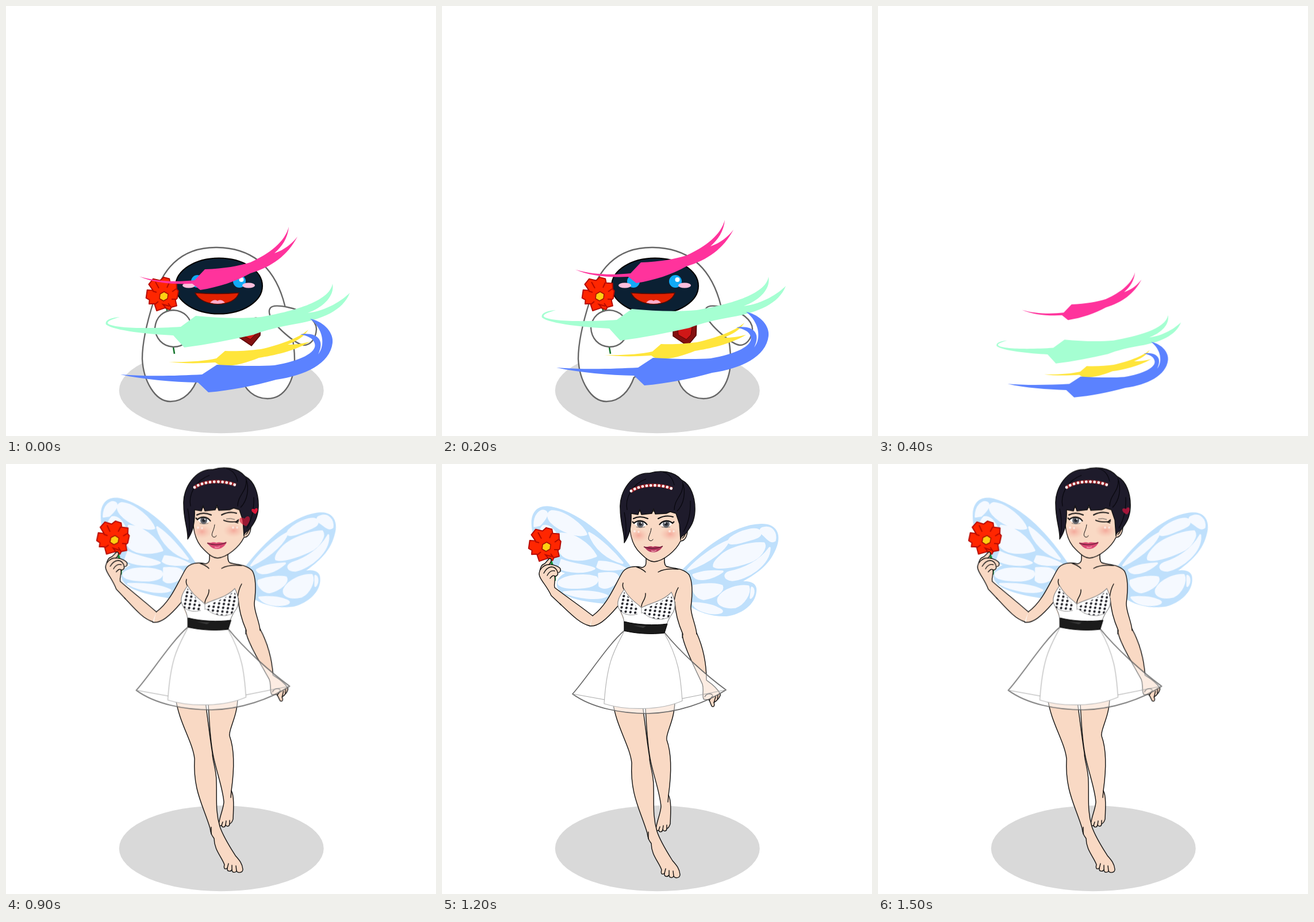
An HTML page that plays this animation: 748x748 px, repeating every 2 s.

```html
<!DOCTYPE html>
<html lang="en">
<head>
<meta charset="utf-8">
<title>Transformation</title>
<style>
  html, body { margin: 0; width: 100%; height: 100%; overflow: hidden; background: #fff; }
  svg { display: block; width: 100%; height: 100%; }
  .robot, .shadow, .fairy, .ribbons, .pose, .open, .wink, .heart1, .heart2 {
    animation: 2s step-end infinite;
  }
  .robot { animation-name: robot; }
  .shadow { animation-name: shadow; }
  .fairy { animation-name: fairy; }
  .ribbons { animation-name: swirl; }
  .pose { animation-name: pose; }
  .open { animation-name: open; }
  .wink { animation-name: wink; }
  .heart1 { animation-name: heart1; }
  .heart2 { animation-name: heart2; }

  @keyframes robot { 0% { opacity: 1 } 15%, 100% { opacity: 0 } }
  @keyframes shadow { 0%, 30%, 100% { opacity: 1 } 15% { opacity: 0 } }
  @keyframes fairy { 0% { opacity: 0 } 30%, 100% { opacity: 1 } }
  @keyframes swirl {
    0% { transform: none; opacity: 1 }
    10% { transform: translate(0, -12px); opacity: 1 }
    15% { transform: translate(38px, 86px) scale(.878); opacity: 1 }
    20% { transform: translate(75px, 172.8px) scale(.756); opacity: 1 }
    30% { transform: translate(89.5px, 193.8px) scale(.756); opacity: 1 }
    45%, 100% { transform: none; opacity: 0 }
  }
  @keyframes pose {
    0%, 60% { transform: none }
    45%, 75%, 100% { transform: var(--b) }
  }
  @keyframes open { 0%, 60% { opacity: 1 } 45%, 75%, 100% { opacity: 0 } }
  @keyframes wink { 0%, 60% { opacity: 0 } 45%, 75%, 100% { opacity: 1 } }
  @keyframes heart1 { 0%, 60%, 100% { opacity: 0 } 45% { opacity: 1 } }
  @keyframes heart2 { 0% { opacity: 0 } 75%, 100% { opacity: 1 } }

  .upper { --b: translate(-1px, -6.4px); }
  .skirt { --b: translate(-.5px, -6.4px); }
  .legs { --b: translate(-2px, -2px) scale(1, .99); }
  .wingL { --b: translate(2px, -6px) rotate(4deg) scale(.99); transform-origin: 325px 178px; }
  .wingR { --b: translate(-1px, -6px) rotate(-6.5deg) scale(.98); transform-origin: 415px 185px; }
  .armL { --b: translate(-1px, -7px) rotate(3.6deg); transform-origin: 259px 272px; }
  .armR { --b: translate(-1px, -6.4px) rotate(-4deg); transform-origin: 432px 295px; }

  .skin { fill: #f9d9c4; }
  .ink { stroke: #111; stroke-width: 1.4; stroke-linecap: round; stroke-linejoin: round; }
  .line { fill: none; }
  .wing { fill: #bfe0fc; }
  .cell { fill: #f5f9ff; stroke: #f5f9ff; stroke-width: 3.5; stroke-linejoin: round; }
  .shell { fill: #fff; stroke: #666; stroke-width: 2.4; }
</style>
</head>
<body>
<svg viewBox="0 0 748 748" xmlns="http://www.w3.org/2000/svg">
  <defs>
    <g id="flower">
      <path d="M-21-29 L-9-27 L-3-33 L7-31 L9-24 L20-24 L21-14 L24-11 L23 2 L20 5 L23 15 L14 18 L12 23 L3 20 L-11 26 L-16 14 L-25 15 L-25 8 L-31 5 L-30-9 L-20-9 L-28-19Z"
        transform="rotate(4)" fill="#ff2600" stroke="#b60a00" stroke-width="2" stroke-linejoin="round"/>
      <path d="M-20-9 L-13-7 M-15-25 L-9-14 M9-24 L5-15 M21-13 L14-8 M20 5 L13 5 M12 19 L7 12 M-16 14 L-10 9 M3 20 L-2 14 L9 17"
        fill="none" stroke="#b60a00" stroke-width="2"/>
      <path d="M-7-4 L0-8 L7-4 L6 4 L-1 8 L-8 4Z" fill="#ffd012" stroke="#a31700" stroke-width="1.6"/>
    </g>
    <path id="heart" d="M0 5 C-9-1-5-8 0-3 C5-8 9-1 0 5Z"/>
    <pattern id="dots" width="8.4" height="6.6" patternUnits="userSpaceOnUse" patternTransform="translate(313 226) skewX(-5) rotate(6)">
      <circle cx="4" cy="3.3" r="2.1" fill="#1b1b22"/>
    </pattern>
    <radialGradient id="blush">
      <stop offset="0" stop-color="#f29a8e" stop-opacity=".75"/>
      <stop offset="1" stop-color="#f6b6a5" stop-opacity="0"/>
    </radialGradient>
  </defs>

  <ellipse class="shadow" cx="374.700" cy="668.700" rx="178" ry="74.500" fill="#d9d9d9"/>

  <g class="robot">
    <path class="shell" d="M367 420 C302 419 269 461 257 513 C242 560 237 590 237 614 C239 652 259 688 286 688 C310 688 326 669 334 646 C350 638 398 638 410 646 C414 667 432 683 455 683 C486 683 502 650 502 615 C502 583 493 550 482 510 C465 455 430 421 367 420Z"/>
    <path class="shell" d="M459 538 C454 521 466 519 490 524 C522 530 540 548 540 562 C539 580 529 590 518 590 C503 588 466 556 459 538Z"/>
    <ellipse cx="370.500" cy="487" rx="75.500" ry="48.500" fill="#0b2033" stroke="#000" stroke-width="2"/>
    <g fill="#12aaf6"><circle cx="333" cy="479" r="11"/><circle cx="406" cy="479" r="11"/></g>
    <circle cx="409.500" cy="476" r="4" fill="#fff"/>
    <g fill="#ffbfdd"><ellipse cx="318" cy="486" rx="11" ry="4.500"/><ellipse cx="422" cy="486" rx="11" ry="4.500"/></g>
    <path d="M329 499 Q367 502 405 499 C398 525 340 525 329 499Z" fill="#e32100" stroke="#5d0a00" stroke-width="1.500"/>
    <path d="M355 516 Q362 509 368 513 Q374 509 381 516 Q368 520 355 516Z" fill="#ffaccb"/>
    <path d="M402 574 L402 553 Q414 540 423 549 Q432 538 443 545 L442 573 L427 591Z" fill="#841010" stroke="#500" stroke-width="1.500"/>
    <path d="M410 560 L424 555 L436 551 L433 572 L425 580 L411 572Z" fill="#cf1717" stroke="#600" stroke-width="1"/>
    <path d="M279 523 L293 605" stroke="#14752c" stroke-width="2.600"/>
    <use href="#flower" x="275" y="505"/>
    <path class="shell" d="M291 529 C310 530 323 543 323 562 C321 581 310 593 291 593 C272 592 260 578 259 560 C261 540 274 530 291 529Z"/>
  </g>

  <g class="fairy">
    <g class="pose wingL">
      <path class="wing" d="M330 180 C295 135 245 85 190 74 C165 70 153 85 156 110 C160 150 185 180 214 190 C203 195 198 204 200 213 C205 232 245 240 285 243 C305 240 315 200 330 180Z"/>
      <path class="cell" d="M161 108 C160 88 172 79 179 82 C188 86 176 100 170 106Z
        M191 82 C215 82 245 108 251 122 C235 128 205 116 190 101 C182 92 184 84 191 82Z
        M176 108 C188 105 200 120 203 135 C208 155 200 165 190 160 C174 148 162 124 176 108Z
        M206 121 C228 120 256 138 268 160 C240 171 215 167 207 155 C211 142 207 132 206 121Z
        M256 120 C275 130 300 155 314 172 C290 166 265 148 256 120Z
        M273 170 C290 169 305 175 318 181 C298 185 277 185 270 179Z
        M208 167 C230 176 255 176 265 182 C250 190 220 189 204 181Z
        M203 205 C215 193 250 191 268 197 C275 205 265 214 240 215 C220 216 200 214 203 205Z
        M273 191 C295 188 311 189 305 204 C295 214 282 219 274 212Z
        M212 223 C240 220 270 221 287 229 C272 237 235 233 212 223Z"/>
    </g>
    <g class="pose wingR">
      <path class="wing" d="M410 192 C450 150 505 105 555 104 C582 103 590 122 583 142 C572 175 548 190 524 204 C540 203 549 210 547 222 C545 245 520 262 495 265 C470 266 445 258 428 245Z"/>
      <path class="cell" d="M560 111 C574 108 582 120 579 133 C572 138 566 129 559 123 C552 117 553 112 560 111Z
        M502 129 C520 115 549 109 553 118 C557 127 545 129 520 136 C503 140 493 139 502 129Z
        M485 160 C500 145 540 136 560 138 C565 146 553 164 535 170 C510 179 480 183 473 178 C472 172 478 166 485 160Z
        M428 184 C445 165 475 143 498 134 C493 147 470 169 428 184Z
        M437 193 C455 186 470 186 488 187 C470 200 443 206 437 193Z
        M500 188 C525 183 553 170 570 146 C569 176 530 200 505 202 C490 200 490 191 500 188Z
        M438 212 C460 207 480 209 487 212 C491 221 475 232 455 235 C440 232 435 217 438 212Z
        M481 233 C490 217 518 210 533 213 C537 225 525 244 510 249 C492 251 477 245 481 233Z
        M539 215 C544 218 542 229 537 233Z
        M436 242 C450 242 470 245 480 251 C497 258 480 261 465 259 C450 256 440 250 436 242Z"/>
    </g>

    <g class="pose legs skin ink">
      <path d="M405 412 C405 446 388 470 391 480 C400 505 399 540 394 576 C399 585 398 605 397 626 C395 632 393 634 391 634 C391 639 386 640 384 636 C383 641 378 641 377 637 C374 639 371 636 373 630 C375 618 380 608 381 596 C379 570 367 540 362 512 C356 480 356 450 353 412"/>
      <path class="line" d="M384 636 L385 629 M391 634 L391 628 M377 637 L379 631 M394 576 L393 588"/>
      <path d="M297 412 C302 455 327 490 330 520 C327 575 345 602 357 642 C358 652 361 656 364 660 C364 680 377 692 382 706 C380 713 383 715 387 712 C386 718 392 719 395 715 C395 720 401 721 403 717 C405 721 414 721 414 714 C413 703 407 697 401 690 C391 674 380 657 374 639 C366 612 369 590 368 560 C368 538 361 524 361 510 C356 478 353 450 348 412"/>
      <path class="line" d="M387 712 L389 704 M395 715 L395 707 M403 717 L402 708 M359 640 L359 652"/>
    </g>

    <g class="pose armR skin ink">
      <path d="M418 294 C417 310 440 355 453 383 C456 394 452 401 455 409 C459 411 462 408 465 411 L469 421 C472 424 475 421 473 415 C478 412 485 405 484 400 C478 388 467 381 460 376 C460 355 457 325 443 294"/>
      <path class="line" d="M457 405 C460 399 466 399 470 401 M465 411 L471 403 M473 415 L476 405 M479 409 L480 402"/>
    </g>

    <g class="pose upper">
      <path class="skin" d="M355 158 C355 172 356 178 348 180 C335 177 320 178 313 190 C300 212 288 245 262 264 L258 282 C270 284 285 272 306 247 L315 270 H393 L405 240 C406 262 412 280 418 296 L443 296 C442 280 432 262 433 248 C436 225 436 205 430 193 C420 180 400 182 390 178 C386 175 387 165 387 158Z"/>
      <path class="line ink" d="M355 164 C355 173 356 178 348 180 C335 177 320 178 313 190 C300 212 288 245 262 264 M256 281.500 C270 284 285 272 306 247 M405 240 C406 262 412 280 419 296 L418 302 M443 296 C442 280 432 262 433 248 C436 225 436 205 430 193 C420 180 400 182 390 178 C386 175 387 168 387 160 M338 179 Q348 182 354 188 M376 188 Q388 181 411 183 M315 207 Q313 213 317 219 M411 215 Q405 225 404 240"/>
      <path d="M317 218 C309 229 302 241 308 252 C315 264 318 270 317 292 H387 C391 278 393 270 402 258 C408 247 405 235 399 223 C383 240 360 242 347 250 C338 241 326 235 317 218Z" fill="#fff" stroke="#888" stroke-width="1.200"/>
      <path fill="url(#dots)" d="M317 223 C311 231 305 243 311 257 C322 265 335 263 341 260 C344 252 334 242 317 223Z M398 227 C404 240 404 256 394 267 C380 273 360 270 348 257 C356 247 382 243 398 227Z"/>
      <path d="M311 257 Q325 266 340 261 M347 250 V260 M348 258 Q371 277 395 267" fill="none" stroke="#999" stroke-width="1"/>
      <path class="line ink" d="M354 225 C355 236 347 239 347 248"/>
    </g>

    <g class="pose armL">
      <path d="M187 163 C194 180 197 190 196 203" fill="none" stroke="#17943b" stroke-width="4"/>
      <use href="#flower" x="182" y="144"/>
      <g class="skin ink">
        <path d="M257 281.500 C240 278 223 260 205 243 L190 229 C182 211 168 199 169 190 C171 183 171 176 179 173 L187 164 C192 165 190 171 186 175 C195 174 207 180 206 184 C207 188 203 189 201 189 C203 192 199 196 196 195 C198 203 194 208 196 215 C214 229 239 246 262 264"/>
        <path class="line" d="M171 184 Q177 175 186 175 M177 190 Q182 180 190 179 Q198 179 201 188 M183 194 Q188 184 196 186 M188 199 Q193 192 196 195 M205 243 L207 245"/>
      </g>
    </g>

    <g class="pose skirt">
      <path d="M317 290 C290 312 250 375 227 400 C260 424 310 434 358 434 C410 433 460 415 494 393 C460 368 415 328 387 293Z" fill="#fff" fill-opacity=".5" stroke="#6b6b6b" stroke-width="1.700" stroke-linejoin="round"/>
      <path d="M317 291 C300 324 287 342 282 417 C320 429 380 429 418 412 C415 375 414 342 386 293Z" fill="#fff" stroke="#b5b5b5" stroke-width="1.200"/>
      <path d="M228 400 L283 410 M418 408 L493 393" fill="none" stroke="#aaa" stroke-width="1.100"/>
      <path d="M317 274 C340 280 370 281 392 278 L387 294 C365 297 335 295 317 290Z" fill="#1b1b1b" stroke="#000"/>
      <path d="M333 281 L355 282 L350 285Z" fill="#3b3b3b"/>
    </g>

    <g class="pose upper">
      <path class="skin ink" d="M326 82 C325 118 329 140 345 155 C356 166 362 170 369 170 C385 169 407 151 415 134 C424 134 429 121 426 109 L418 82Z"/>
      <path class="line ink" d="M418 129 Q424 125 423 117"/>
      <g fill="url(#blush)"><ellipse cx="342" cy="124" rx="17" ry="12"/><ellipse cx="397" cy="122" rx="18" ry="12"/></g>
      <g fill="#fff" opacity=".6"><circle cx="335" cy="117" r="2"/><circle cx="342" cy="118" r="1.700"/><circle cx="396" cy="117" r="2"/><circle cx="403" cy="117" r="1.700"/></g>

      <g class="line ink">
        <path d="M333 95 Q344 89 358 95 M376 95 Q389 88 402 92" stroke-width="2"/>
        <path d="M364 112 C363 123 356 129 361 133 Q365 135 367 131" stroke-width="1"/>
      </g>
      <g id="eye">
        <path d="M334 103 C340 98 351 98 357 105 C351 111 339 111 334 103Z" fill="#fff"/>
        <circle cx="345" cy="104.500" r="6" fill="#62656d"/><circle cx="345" cy="104.500" r="2.800" fill="#24262c"/><circle cx="347" cy="102.500" r="1.200" fill="#fff"/>
        <path class="line" d="M331 100 L334 103 C340 97 351 97 357 106" stroke="#111" stroke-width="2.200"/>
        <path class="line" d="M338 109.500 Q345 112 353 109.500" stroke="#555" stroke-width=".8"/>
      </g>
      <use class="open" href="#eye" transform="matrix(-1 0 0 1 735 0)"/>
      <g class="wink line">
        <path d="M379 104 Q390 109 406 106 M399 107 L405 109 M401 107 L406 103" stroke="#111" stroke-width="1.700"/>
        <path d="M384 102 Q392 100 399 103" stroke="#444" stroke-width=".9"/>
      </g>

      <path d="M351 144 C357 146 361 141 367 144 C373 141 377 146 384 143 C378 155 364 156 357 150Z" fill="#b83b61"/>
      <path class="wink" d="M351 143 C357 145 361 141 367 144 C373 141 377 145 385 142 C379 156 364 157 357 149Z" fill="#dc4774"/>
      <path class="line" d="M351 144 Q367 150 384 143" stroke="#681d35" stroke-width="1.400"/>
      <path d="M364 151 Q369 153 373 150" class="line" stroke="#f3a3b5" stroke-width="1.400"/>

      <path class="ink" fill="#1e1b2b" d="M317 137 C318 120 310 105 310 77 C308 48 331 14 361 16 C379 10 404 12 417 28 C433 36 441 58 440 82 C439 103 430 112 424 121 C416 127 415 127 415 132 L413 104 L407 86 L397 83 L390 86 L371 87 L368 78 L365 86 L347 88 L344 79 L341 88 L329 86 C330 110 326 125 317 137Z"/>
      <path class="line" d="M322 80 C318 60 330 35 355 26 M404 80 C404 60 420 55 419 34 M409 82 C421 70 425 48 418 31 M432 64 Q433 96 420 118 M384 14 Q400 18 404 37 M317 84 Q322 106 319 130" stroke="#08070d" stroke-width="1.200"/>
      <path class="line" d="M328 48 C343 36 375 33 401 43" stroke="#9f2328" stroke-width="5.500"/>
      <path class="line" d="M329 47 C343 37 375 33 400 43" stroke="#fff" stroke-width="4.800" stroke-linecap="round" stroke-dasharray="0 7.200"/>
    </g>

    <g class="heart1" fill="#dc1738">
      <use href="#heart" transform="translate(433 82) rotate(-12)"/>
      <use href="#heart" transform="translate(416 100) rotate(-12) scale(1.700)" opacity=".65"/>
    </g>
    <use class="heart2" href="#heart" transform="translate(432 82) rotate(-12) scale(1.200)" fill="#a3163a"/>
  </g>

  <g class="ribbons">
    <path fill="#ff339c" d="M232 470.500 C262 480 300 480 328 477 L346 458 C380 457 405 452 425 446 C460 430 485 410 492 384 C490 405 480 418 467 430 C485 424 498 413 507 401 C490 434 462 454 425 465 C400 479 370 489 338 494 L324 483 C290 485 255 481 232 470.500Z"/>
    <path fill="#a5ffd2" d="M198 541 C180 546 174 550 178 553 C192 562 260 561 304 558 L330 539 C370 543 410 544 443 541 C495 532 563 515 568 483 C572 505 552 524 525 534 C558 530 585 512 598 499 C586 530 550 545 504 553 C475 558 451 564 430 572 C390 581 350 589 310 594 L291 573 C250 571 188 565 174 554 C171 547 182 542 198 541Z"/>
    <path fill="#ffe53b" d="M283 619 C310 620 345 618 366 613 L381 600 C405 601 425 599 443 597 C475 590 509 578 526 563 C517 577 506 582 490 589 C505 589 517 587 529 584 C500 601 465 608 440 612 C420 620 400 626 375 627 L364 620 C335 622 305 622 283 619Z"/>
    <path fill="#5b82ff" d="M199 641 C250 645 300 643 341 641 L367 624 C400 626 440 627 467 625 C510 618 542 603 537 587 C534 577 524 574 512 571 C540 567 556 580 543 606 C556 590 552 562 529 544 C556 550 570 570 568 586 C564 622 520 643 470 650 C430 661 390 669 352 672 L334 655 C290 654 240 650 199 641Z"/>
  </g>
</svg>
</body>
</html>
```
